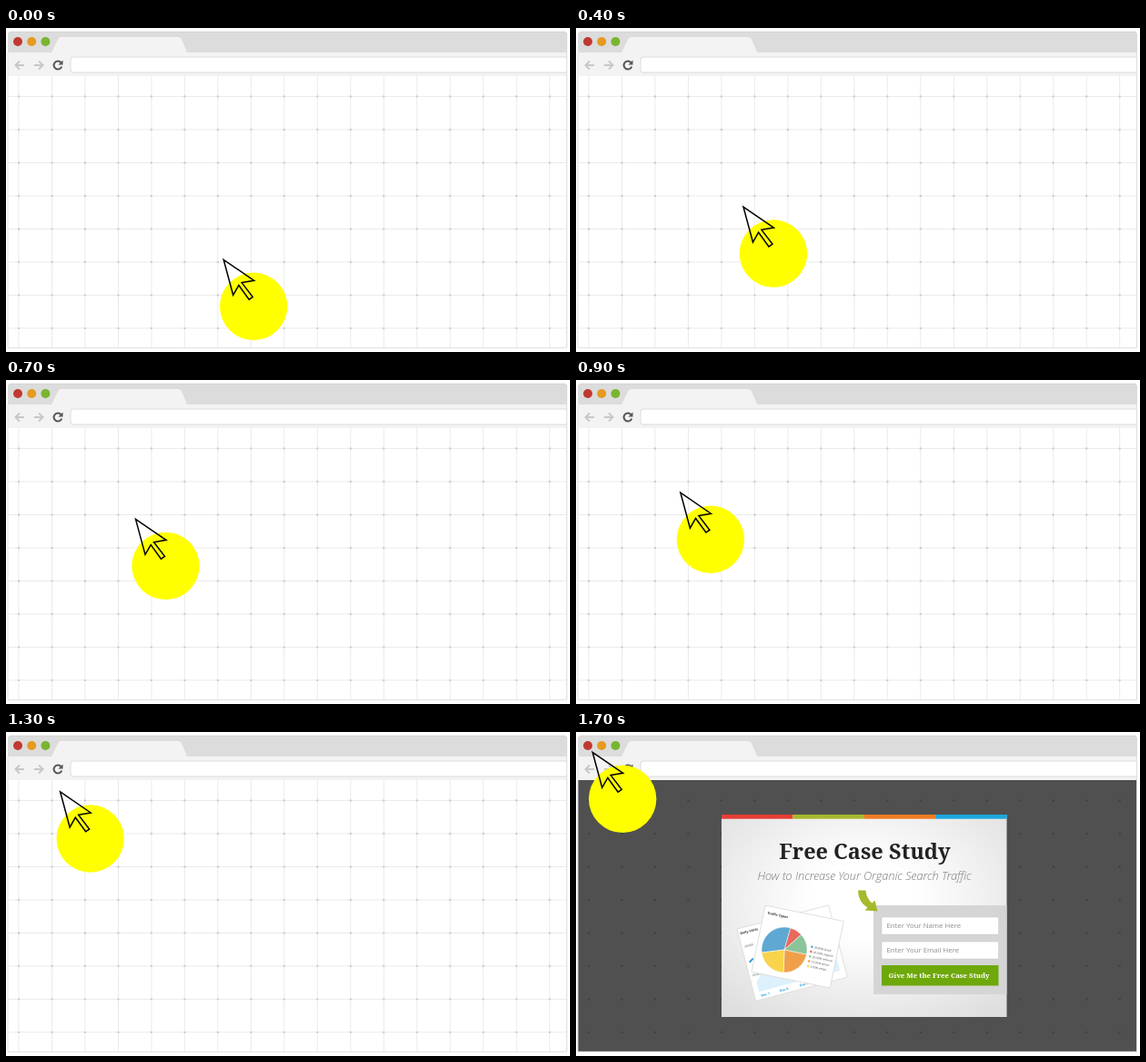
An HTML page for the animation above (4700 ms loop, 620x357 px).

```html
<!DOCTYPE html>
<html lang="en">
<head>
<meta charset="utf-8">
<title>Exit popup</title>
<style>
  html, body { margin: 0; width: 100%; height: 100%; overflow: hidden; background: #fff; }
  svg { display: block; width: 620px; height: 357px; }
  text { font-family: "Open Sans", sans-serif; }
  .slab { font-family: "Noto Serif", serif; font-weight: 700; text-anchor: middle; }
  .hint { font-size: 7.8px; fill: #8c8c8c; }
  .tiny { font-size: 3.2px; fill: #444; }
  .head { font-size: 3.7px; font-weight: 700; fill: #333; }
  .card { fill: #fff; stroke: #d6d6d6; stroke-width: .7; }
</style>
</head>
<body>
<svg viewBox="0 0 620 357">
  <defs>
    <radialGradient id="glow" cx=".5" cy=".42" r=".72">
      <stop offset=".25" stop-color="#fff"/>
      <stop offset="1" stop-color="#dedede"/>
    </radialGradient>
  </defs>

  <!-- page -->
  <g id="grid"></g>
  <rect id="shade" x="2" y="53" width="615" height="299" fill="#505050"/>
  <g id="dots"></g>

  <!-- browser window -->
  <path d="M2 27V7q0-3 3-3H614q3 0 3 3V27z" fill="#dcdcdc"/>
  <path d="M4 4.2H615" stroke="#cfcfcf" stroke-width=".8"/>
  <rect x="2" y="27" width="615" height="26" fill="#f3f3f3"/>
  <path d="M50 27.5L57 12.500Q58 10 61 10H189Q192 10 193 12.500L199.500 27.500z" fill="#f3f3f3"/>
  <path d="M617 32H74q-3 0-3 3V46q0 3 3 3H617" fill="#fff" stroke="#dcdcdc"/>
  <path d="M2 27V352.300H616.500V27" fill="none" stroke="#dedede"/>
  <circle cx="13" cy="15" r="5" fill="#c0392f"/>
  <circle cx="28.200" cy="15" r="5" fill="#e69a20"/>
  <circle cx="43.400" cy="15" r="5" fill="#78b52f"/>
  <path d="M20 41H10.500M15 36.500L10.500 41L15 45.500M31 41H40.500M36 36.500L40.500 41L36 45.500"
        fill="none" stroke="#c8c8c8" stroke-width="2"/>
  <path d="M60.500 38A4.500 4.500 0 1 0 61.300 42.500" fill="none" stroke="#555" stroke-width="2"/>
  <path d="M62.500 35.500V40.500H57.500z" fill="#555"/>

  <!-- popup -->
  <g id="popup">
    <rect x="160" y="91" width="313.500" height="223" fill="url(#glow)"/>
    <g id="stripe"></g>
    <text class="slab" x="317.500" y="140" font-size="23.500" fill="#222">Free Case Study</text>
    <text x="317" y="163" font-size="12.800" font-weight="300" font-style="italic" text-anchor="middle" fill="#777">How to Increase Your Organic Search Traffic</text>

    <g transform="translate(177 217) rotate(-14.600)">
      <rect class="card" width="104" height="82"/>
      <text class="head" x="2" y="7">Daily Visits</text>
      <path d="M6 62L18 50L40 57L62 47L84 54L98 45V73H6z" fill="#dcf1fb"/>
      <path d="M4 39l5-3" stroke="#35a3d8" stroke-width="2"/>
      <g class="tiny">
        <text x="3" y="22">20,000</text>
        <text x="3" y="55">10,000</text>
      </g>
      <g class="head" style="fill:#35a3d8">
        <text x="7" y="79">Dec 1</text>
        <text x="28" y="79">Dec 8</text>
        <text x="51" y="79">Dec 15</text>
      </g>
    </g>
    <g transform="translate(208 191) rotate(11.500)">
      <rect class="card" width="88" height="75"/>
      <text class="head" x="4" y="9">Traffic Types</text>
      <g id="legend"></g>
    </g>
    <g id="pie" transform="translate(229 240)" stroke="#fff" stroke-width=".5"></g>

    <rect x="327" y="191" width="146.500" height="98" fill="#d5d5d5"/>
    <g fill="#fff" stroke="#c8c8c8" stroke-width=".5">
      <rect x="336" y="204" width="128.500" height="19"/>
      <rect x="336" y="231" width="128.500" height="19"/>
    </g>
    <text class="hint" x="341.500" y="216.300">Enter Your Name Here</text>
    <text class="hint" x="341.500" y="243.300">Enter Your Email Here</text>
    <rect x="336" y="257" width="128.500" height="22.500" fill="#6ea80a"/>
    <text class="slab" x="399" y="271" font-size="7.800" fill="#fff">Give Me the Free Case Study</text>
    <path d="M310 174.500H318.500Q319 183 325.500 188.500L328.500 185.500L331.500 197.500L317.500 196.500L320.500 193.500Q310 187 310 174.500z" fill="#a6b92c"/>
  </g>

  <!-- pointer, placed by its tip -->
  <g id="pointer">
    <circle cx="33" cy="51.500" r="37.200" fill="#ff0"/>
    <path d="M0 0L33.500 23L20 25.300L32 41L28 43.800L16.700 28.200L10.500 39z" fill="none" stroke="#000" stroke-width="1.500"/>
  </g>
</svg>
<script>
const $ = id => document.getElementById(id);
const STEP = 100, MOVES = 16, LOOP = 4700, GAP = 36.48;

let lines = "", dots = "";
for (let i = 0; i < 17; i++) lines += `M${14 + i * GAP} 53V352`;
for (let j = 0; j < 8; j++) {
  const y = 75.5 + j * GAP;
  lines += `M2 ${y}H617`;
  for (let i = 0; i < 17; i++) dots += `<circle cx="${14 + i * GAP}" cy="${y}" r="1.2"/>`;
}
$("grid").innerHTML = `<path d="${lines}" stroke="#ebebeb"/>`;
$("dots").innerHTML = dots;

$("stripe").innerHTML = ["#e63e34", "#a6b92c", "#f07b22", "#1ba7de"]
  .map((c, i) => `<rect x="${160 + i * 78.4}" y="91" width="78.4" height="4.7" fill="${c}"/>`).join("");

// start and end angles in degrees, clockwise from the right
const slices = [
  ["#5fa8d3", 173, 286, "30.00% book"],
  ["#e8695e", 286, 318, "20.00% organic"],
  ["#8cc49a", 318, 372, "20.00% referral"],
  ["#f0a04b", 12, 92, "10.00% direct"],
  ["#f8d44c", 92, 173, "3.00% email"]
];
const rim = deg => [Math.cos(deg * Math.PI / 180) * 25, Math.sin(deg * Math.PI / 180) * 25];
$("pie").innerHTML = slices.map(([c, a, b]) =>
  `<path d="M0 0L${rim(a)}A25 25 0 0 1 ${rim(b)}z" fill="${c}"/>`).join("");
$("legend").innerHTML = slices.map(([c, , , label], i) => {
  const y = 34.5 + i * 5.4;
  return `<circle cx="59.5" cy="${y}" r="1.3" fill="${c}"/><text class="tiny" x="62" y="${y + 1.2}">${label}</text>`;
}).join("");

function draw(now) {
  const step = Math.floor(now % LOOP / STEP);
  const p = Math.min(step, MOVES) / MOVES;
  const open = step > MOVES;
  $("pointer").setAttribute("transform", `translate(${239.2 - 221 * p} ${255.3 - 233 * p})`);
  $("popup").style.display = $("shade").style.display = open ? "" : "none";
  $("dots").setAttribute("fill", open ? "#404040" : "#cdcdcd");
}
const start = performance.now();
function tick() {
  draw(performance.now() - start);
  requestAnimationFrame(tick);
}
tick();
</script>
</body>
</html>
```
